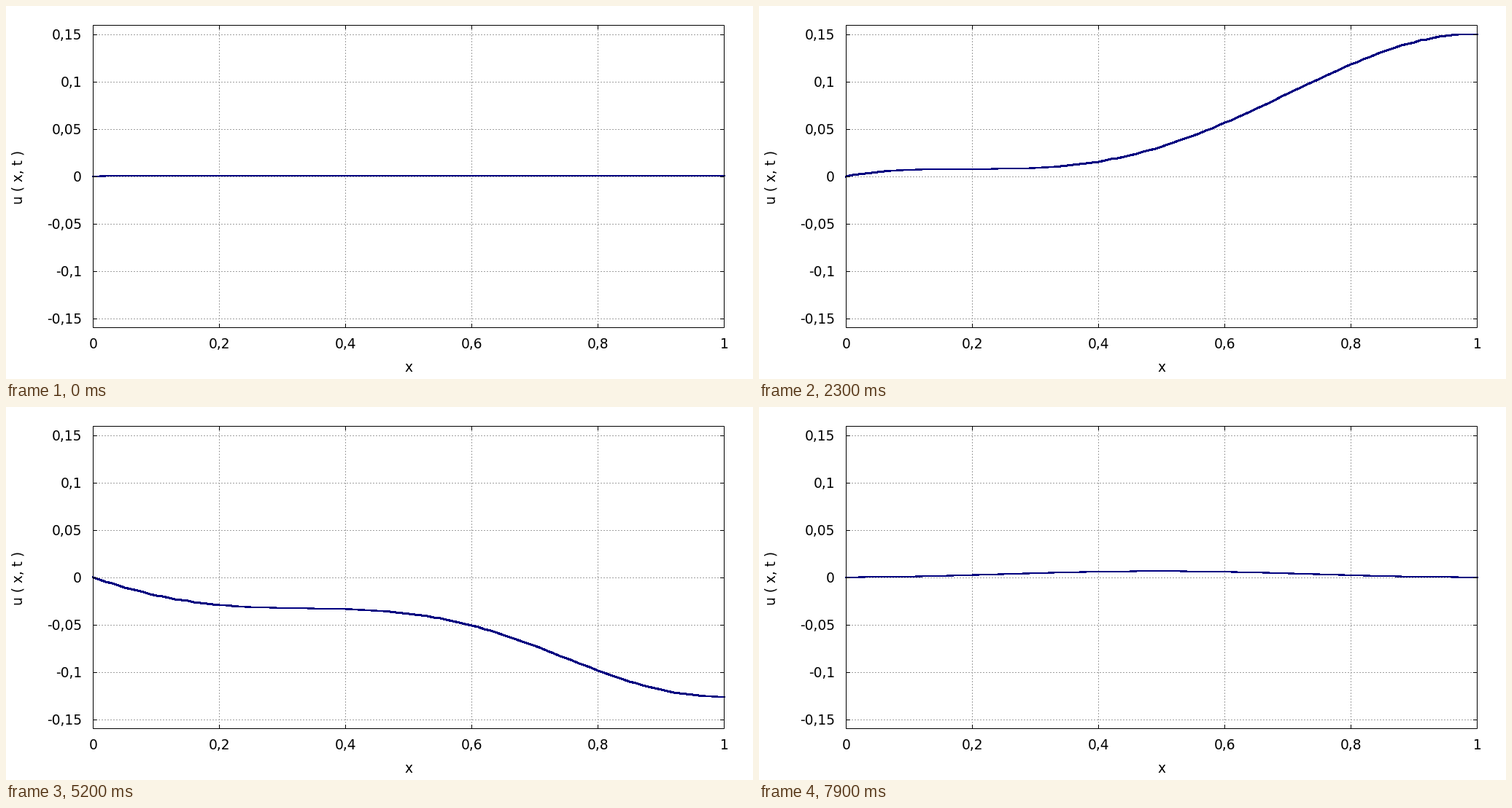
Write a matplotlib script that moves like this. It is 1024x512 px and loops after 8 s.

```python
import numpy as np
import matplotlib.pyplot as plt
from matplotlib.animation import FuncAnimation
from matplotlib.patches import Rectangle

W, H, DPI = 1024, 512, 100
PX = 72 / DPI                      # one pixel in points
LEFT, RIGHT, TOP, BOTTOM = 119, 984, 26, 441
FRAMES, INTERVAL, DT = 80, 100, 0.05
OMEGA = 2 * np.pi
WALL = 0.995                       # free end sits half a grid cell inside

plt.rcParams["font.family"] = "DejaVu Sans"
plt.rcParams["font.size"] = 14 * 96 / DPI

fig = plt.figure(figsize=(W / DPI, H / DPI), dpi=DPI, facecolor="white")
ax = fig.add_axes([0, 0, 1, 1])
ax.set_xlim(-0.5, W - 0.5)         # integers are pixel centres
ax.set_ylim(H - 0.5, -0.5)
ax.axis("off")


def line(x0, y0, x1, y1, color="black", z=4, **kw):
    ax.plot([x0, x1], [y0, y1], color=color, lw=PX, zorder=z, snap=False,
            solid_capstyle="butt", dash_capstyle="butt", **kw)


def grid(x0, y0, x1, y1):
    line(x0, y0, x1, y1, "#a0a0a0", 1, linestyle=(0, (2, 2)))


def label(value):
    return f"{value:g}".replace(".", ",")


def col(x):
    return np.rint(LEFT + (RIGHT - LEFT) * x)


def row(u):
    return np.rint(233.6 - 1297 * u)


for i in range(6):
    x = col(i / 5)
    if 0 < i < 5:
        grid(x, BOTTOM + 0.5, x, TOP - 0.5)
        line(x, TOP, x, TOP + 5.5)
        line(x, BOTTOM, x, BOTTOM - 5.5)
    ax.text(x, 469, label(i / 5), ha="center", va="baseline")

for i in range(-3, 4):
    y = 234 - 65 * i
    grid(LEFT - 0.5, y, RIGHT + 0.5, y)
    line(LEFT, y, LEFT + 5.5, y)
    line(RIGHT, y, RIGHT - 5.5, y)
    ax.text(103.5, y + 6.5, label(i / 20), ha="right", va="baseline")

ax.add_patch(Rectangle((LEFT, TOP), RIGHT - LEFT, BOTTOM - TOP, fill=False,
                       ec="black", lw=PX, zorder=5, snap=False,
                       joinstyle="miter"))
ax.text(551, 502, "x", ha="center", va="baseline")
ax.text(22, 234, "u ( x, t )", rotation=90, rotation_mode="anchor",
        ha="center", va="baseline")

xs = np.linspace(0, 1, 101)
inner = np.where(xs > WALL, 2 * WALL - xs, xs)
curve, = ax.plot([], [], color="#000080", lw=2 * PX, zorder=3, snap=False,
                 antialiased=False, solid_capstyle="projecting",
                 solid_joinstyle="miter")


def free(t):
    """Displacement of an unbounded string under the force sin(OMEGA t)."""
    t = np.maximum(t, 0)
    return t / OMEGA - np.sin(OMEGA * t) / OMEGA ** 2


def wave(x, t):
    """String fixed at x = 0 and free at WALL, by reflected waves."""
    u = free(t)
    for k in range(3):
        s = t - 2 * k * WALL
        u = u - (-1) ** k * (free(s - x) + free(s - 2 * WALL + x))
    return u


def update(n):
    u = wave(inner, DT * (n + 1))
    curve.set_data(col(xs), row(u) - 0.5)
    return curve,


anim = FuncAnimation(fig, update, frames=FRAMES, interval=INTERVAL,
                     repeat=True, repeat_delay=0, blit=False)
plt.show()
```
